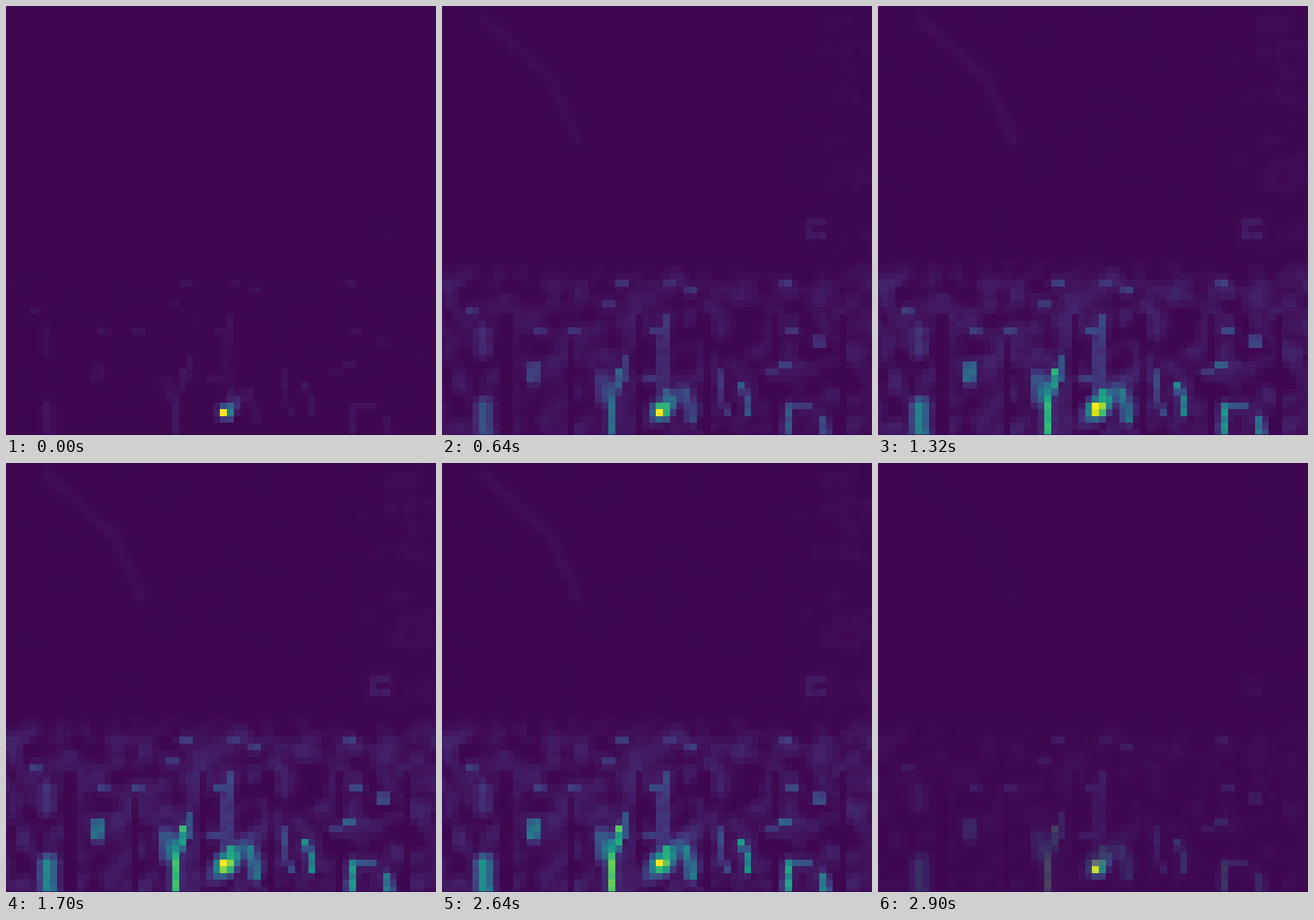
A matplotlib script for the animation above (2960 ms loop, 732x729 px).

```python
import numpy as np
import matplotlib.pyplot as plt
from matplotlib.animation import FuncAnimation

W, H, DPI = 732, 729, 64
N, CELL = 64, 11.575          # cells per side, cell size in pixels
LEFT, TOP = -6.0, -9.3
STEP, LOOP = 20, 2960         # ms
HOLD, FADE, PERIOD = 200, 60, 440
KEYS = 7

rng = np.random.default_rng(11)
rows, cols = np.mgrid[0:N, 0:N].astype(float)


def smooth(a, axis):
    return (np.roll(a, 1, axis) + 2 * a + np.roll(a, -1, axis)) / 4


def noise_floor():
    """Faint texture, strong only in the lower part and thin at column gaps."""
    n = smooth(smooth(rng.random((N, N)) ** 2, 0), 1)
    n = np.clip(n - 0.15, 0, 1)
    fade = 0.06 + 0.94 * np.clip((rows - 37) / 4, 0, 1)
    fade += 0.2 * np.clip((cols - 50) / 8, 0, 1) * (rows < 40)
    gap = (cols % 10 >= 8.5) | (cols % 29 == 10)
    return 0.17 * n * fade * np.where(gap & (rows > 45), 0.2, 1)


floor = noise_floor()
grain = rng.uniform(0.8, 1.15, (N, N))
early, late = 0.5 * floor, floor.copy()


def streak(strength, width, *pts):
    """Soft line through pts that starts faint and grows to its strength."""
    d = np.full((N, N), np.inf)
    for (x0, y0), (x1, y1) in zip(pts, pts[1:] or pts):
        dx, dy = x1 - x0, y1 - y0
        u = ((cols - x0) * dx + (rows - y0) * dy) / max(dx * dx + dy * dy, 1e-9)
        u = np.clip(u, 0, 1)
        d = np.minimum(d, np.hypot(cols - x0 - u * dx, rows - y0 - u * dy))
    p = grain * np.exp(-(d / width) ** 2)
    start = min(0.7 * strength, 0.08 + 0.06 * strength)
    np.maximum(early, start * p, out=early)
    np.maximum(late, strength * p, out=late)


def draw_streaks():
    # left: two stacks and a short block
    streak(0.13, 1.2, (6, 48), (6, 51))
    streak(0.45, 1.3, (6.2, 59), (6.2, 63))
    streak(0.45, 0.9, (13.5, 53.3), (13.5, 55))
    # tall bar with its wide shoulder
    streak(0.36, 1.1, (23.5, 55), (24, 58))
    streak(0.68, 0.7, (26, 54), (25.6, 56), (25, 58), (25, 63))
    streak(0.22, 0.7, (27, 52), (27, 55))
    # stem and crown around the peak
    streak(0.17, 0.9, (33, 46), (32.5, 50), (32.5, 56))
    streak(0.2, 0.7, (31, 48), (32, 48))
    streak(0.55, 0.9, (33, 57), (33.6, 58))
    streak(0.4, 0.9, (36, 57), (36.6, 59), (36.6, 61))
    # right: two hooks and an arch
    streak(0.17, 0.7, (41, 54), (41, 58), (42, 60))
    streak(0.42, 0.7, (44, 56), (45, 58), (45, 60))
    streak(0.52, 0.7, (51, 59), (50.8, 63))
    streak(0.22, 0.7, (51, 59), (54, 59))
    streak(0.42, 0.8, (56, 61), (56.3, 63))
    streak(0.3, 0.7, (55, 49.5), (56, 49.5))
    streak(0.28, 0.7, (50, 53), (51, 53))
    streak(0.2, 0.7, (51, 48), (52, 48))
    # pale specks
    for c, r in [(4, 45), (14, 48), (19, 48), (24, 44), (26, 41),
                 (33, 41), (36, 42), (50, 41), (30, 55), (48, 54)]:
        streak(0.14, 0.8, (c, r), (c + 1, r))
    # faint trail across the top and a faint hook on the right
    streak(0.02, 1.2, (6, 2), (16, 11), (20, 20))
    streak(0.05, 0.8, (56, 32), (54, 32), (54, 34), (56, 34))


def peak(m):
    """Brightest spot: drifts up and spreads along its diagonal."""
    x, y = cols - 32.1, rows - (60.15 - 0.85 * m)
    u, v = (x - y) / np.sqrt(2), (x + y) / np.sqrt(2)
    ahead, behind = 1.8 + 1.2 * m, 0.6 + 0.8 * m
    along = np.where(u > 0, u / ahead, -u / behind)
    return np.exp(-along - (v / (1.1 + 0.3 * m)) ** 2)


def key_image(k):
    m = 1 - (1 - k / (KEYS - 1)) ** 1.5
    f = np.maximum(early + (late - early) * m, peak(m))
    f = (f / f.max()) ** (1.5 if k == 0 else 1)
    tint = np.array([-6, 6, -5]) / 255
    rgb = plt.cm.viridis(f)[..., :3] + (1 - f)[..., None] * tint
    return np.clip(rgb, 0, 1)


def image_at(t):
    """Hold each key, then cross-fade in steps; the last fade is shorter."""
    k, u = divmod(t, PERIOD)
    step = 0 if u < HOLD else (u - HOLD) // FADE + 1
    w = step / (2.6 if k == KEYS - 1 else 5)
    return (1 - w) * keys[k] + w * keys[(k + 1) % KEYS]


draw_streaks()
keys = [key_image(k) for k in range(KEYS)]

fig = plt.figure(figsize=(W / DPI, H / DPI), dpi=DPI)
ax = fig.add_axes([0, 0, 1, 1])
ax.axis("off")
grid = ax.imshow(keys[0], interpolation="nearest", aspect="auto",
                 extent=(LEFT, LEFT + N * CELL, TOP + N * CELL, TOP))
ax.add_patch(plt.Rectangle((0, H - 1), W, 1, color="#2c0658", lw=0))
ax.set_xlim(0, W)
ax.set_ylim(H, 0)


def update(i):
    grid.set_data(image_at(i * STEP))
    return [grid]


anim = FuncAnimation(fig, update, frames=LOOP // STEP, interval=STEP,
                     repeat=True, repeat_delay=0)
plt.show()
```
